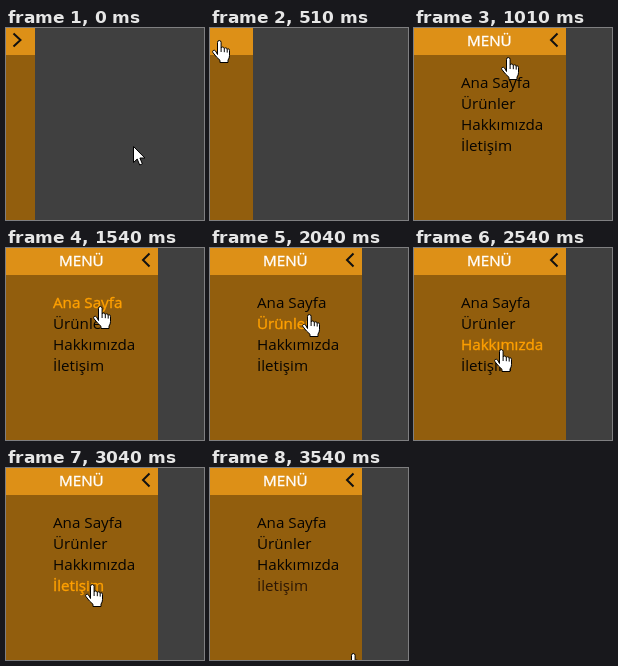
Write an HTML page that moves like this. It is 198x192 px and loops after 4030 ms.

```html
<!DOCTYPE html>
<html lang="tr">
<head>
<meta charset="utf-8">
<title>Menü</title>
<style>
html, body { margin: 0; width: 100%; height: 100%; overflow: hidden; background: #404040; }
svg { display: block; width: 100vw; height: 100vh; }
text { font: 15.2px "Open Sans", "Noto Sans", sans-serif; }
.bright { stroke: currentColor; stroke-width: .35; fill: currentColor; }
.line { fill: none; stroke: #111; stroke-width: 2; }
.cursor { fill: #fff; stroke: #000; stroke-linejoin: round; }
</style>
</head>
<body>
<svg viewBox="0 0 198 192">
  <rect width="198" height="192" fill="#404040"/>
  <rect class="panel" height="192" fill="#925e0d"/>
  <rect class="panel" height="27" fill="#dd9017"/>
  <path id="expand" class="line" d="M7.5 5.5l7 6.5-7 6.5"/>
  <g id="menu">
    <text class="bright" x="53" y="18" color="#fff">MENÜ</text>
    <path class="line" d="M143.5 5.5l-6.5 6.5 6.5 6.5"/>
    <text class="item" x="47" y="60">Ana Sayfa</text>
    <text class="item" x="47" y="81">Ürünler</text>
    <text class="item" x="47" y="102">Hakkımızda</text>
    <text class="item" x="47" y="123">İletişim</text>
  </g>
  <path id="arrow" class="cursor" d="M.5 .5v16l3.7-3.5 2.5 6 2.7-1.1-2.5-5.9h5z"/>
  <g id="hand" class="cursor">
    <path d="M5.5 14.5V2.5q0-2 1.8-2t1.8 2V8q.3-1 1.5-1 1.5 0 1.7 1.6.4-.8 1.4-.8 1.3 0 1.5 1.6.3-.6 1-.6 1.3 0 1.3 1.8v5q0 2.5-1.5 4.5v2.4h-8v-2.2L4.5 17 1 12.7q-.9-1.4.2-2.2 1.2-.7 2.4.5z"/>
    <path fill="none" d="M9.1 8v4M12.3 8.6V12.2M15.2 9.4V12.6"/>
  </g>
</svg>
<script>
const $ = s => document.querySelector(s), $$ = s => document.querySelectorAll(s);
const LOOP = 4030;
// start time, panel width, cursor, position, hovered item, fading item
const states = [
  [0, 29, "arrow", 127, 118],
  [510, 43, "hand", 2, 12],
  [1010, 152, "hand", 87, 29],
  [1540, 152, "hand", 87, 58, 0],
  [2040, 152, "hand", 92, 66, 1],
  [2540, 152, "hand", 80, 101, 2],
  [3040, 152, "hand", 79, 116, 3],
  [3540, 152, "hand", 136, 185, -1, 3]
];
const show = (el, on) => el.setAttribute("visibility", on ? "visible" : "hidden");

function draw(now) {
  const t = now % LOOP;
  const [start, width, cursor, x, y, hover, fading] = states.findLast(s => s[0] <= t);
  $$(".panel").forEach(el => el.setAttribute("width", width));
  show($("#expand"), start === 0);
  show($("#menu"), width === 152);
  $$(".item").forEach((el, i) => {
    el.classList.toggle("bright", i === hover);
    el.setAttribute("color", "#ffa000");
    el.setAttribute("fill", i === fading ? "#2b1605" : "#060402");
  });
  for (const id of ["arrow", "hand"]) show($("#" + id), id === cursor);
  $("#" + cursor).setAttribute("transform", `translate(${x} ${y})`);
  requestAnimationFrame(() => draw(performance.now() - origin));
}
const origin = performance.now();
draw(0);
</script>
</body>
</html>
```
